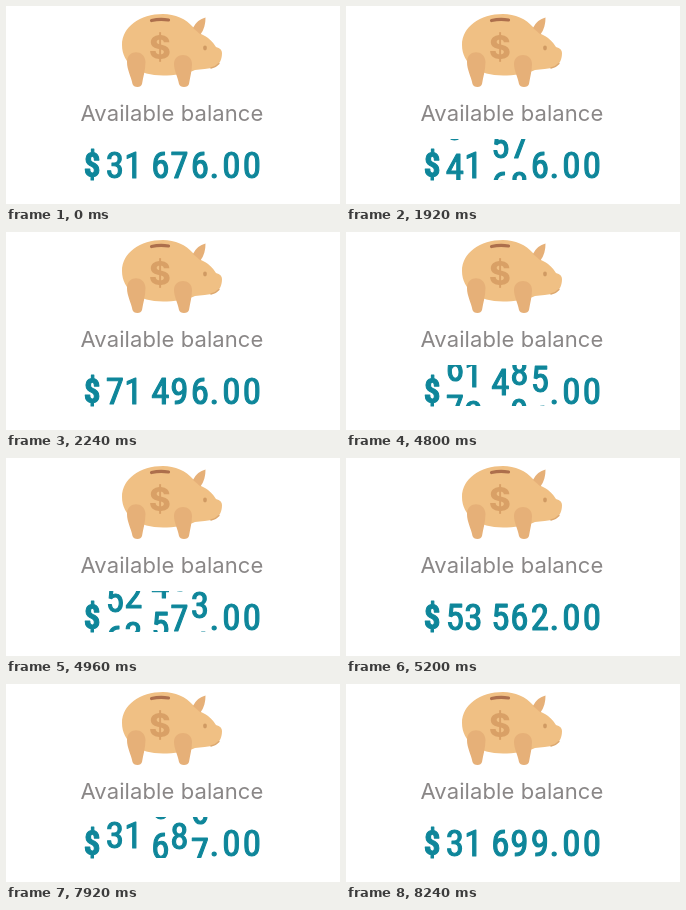
Animation, 334 px wide and 198 px high, one loop 9.04 s. Source, as an HTML page:

```html
<!DOCTYPE html>
<html lang="en">
<head>
<meta charset="utf-8">
<title>Available balance</title>
<style>
  html, body { margin: 0; width: 100%; height: 100%; overflow: hidden; background: #fff; }
  svg { display: block; width: 334px; height: 198px; }
  text { text-anchor: middle; }
  .coin { font: 800 33px Inter, "Open Sans", sans-serif; fill: #d9a066; }
  .label { font: 400 22px Inter, "Open Sans", sans-serif; letter-spacing: .1px; fill: #8a8787; }
  .amount {
    font: 400 37px "Roboto Condensed", Roboto, "Liberation Sans", sans-serif;
    font-stretch: 75%;
    fill: #0e869a; stroke: #0e869a; stroke-width: 1.1; stroke-linejoin: round;
  }
  .amount .sign { font-size: 33px; font-weight: 600; }
</style>
</head>
<body>
<svg viewBox="0 0 334 198">
  <defs>
    <clipPath id="window"><rect x="98" y="133" width="108" height="41"/></clipPath>
  </defs>

  <g id="pig">
    <path fill="#f0c084" d="M116 39C116 21 134 8 157 8C169 8 180 13 187 21L195 28
      C202 31 207 36 210 41C214 42 216 44 216 47C216 53 214 58 209 61
      C202 63 195 63 189 64C180 68 168 69.500 157 69.500C133 69.500 116 58 116 39Z"/>
    <path d="M205 62Q210 61 213 57.500" fill="none" stroke="#dca870" stroke-width="1.300" stroke-linecap="round"/>
    <g fill="#e6b078">
      <path d="M187 22C190 16 194 13 199.500 11.500C199.500 18 198 24 194.500 28.500Z"/>
      <path d="M121 56C121 43 139 43 139.500 56C139.500 64 137 71 136 78Q135 81 131.500 81Q127.500 81 126.500 78C125 70 121 64 121 56Z"/>
      <path d="M168 58C168 46 186 46 186 58C186 65 184 71 183 78Q182 81 178 81Q174 81 173 78C172 71 168 65 168 58Z"/>
    </g>
    <path d="M145.500 14.500Q154 12.500 162.500 14" fill="none" stroke="#ad6f4c" stroke-width="3.200" stroke-linecap="round"/>
    <ellipse cx="199" cy="42" rx="1.900" ry="2.400" fill="#d09a63"/>
    <text class="coin" x="154" y="53">$</text>
  </g>

  <text class="label" x="166" y="115">Available balance</text>

  <g class="amount">
    <text class="sign" x="86" y="170">$</text>
    <g id="reels" clip-path="url(#window)"></g>
    <text x="208.500" y="172">.</text>
    <text x="225.500" y="172">0</text>
    <text x="246" y="172">0</text>
  </g>
</svg>

<script>
  const LOOP = 9040, TICK = 80, PITCH = 40, BASE = 172;
  const columns = [109, 127.5, 154.5, 173.5, 194];
  const first = [3, 1, 6, 7, 6];

  // Each roll: start time, target digits, duration per column.
  const rolls = [
    { at: 1870, to: [7, 1, 4, 9, 6], ms: [331, 311, 311, 311, 311] },
    { at: 4750, to: [5, 3, 5, 6, 2], ms: [371, 371, 354, 446, 446] },
    { at: 7630, to: [3, 1, 6, 9, 9], ms: [411, 411, 390, 559, 602] }
  ];

  const svgNode = (name, parent) =>
    parent.appendChild(document.createElementNS("http://www.w3.org/2000/svg", name));

  const reels = columns.map(x => {
    const reel = svgNode("g", document.getElementById("reels"));
    return Array.from({ length: 10 }, (_, digit) => {
      const text = svgNode("text", reel);
      text.setAttribute("x", x);
      text.textContent = digit;
      return text;
    });
  });

  const easeOut = p => Math.sin(Math.min(1, Math.max(0, p)) * Math.PI / 2);

  function position(column, time) {
    let value = first[column];
    for (const { at, to, ms } of rolls) {
      value += (to[column] - value) * easeOut((time - at) / ms[column]);
    }
    return value;
  }

  function draw(time) {
    reels.forEach((digits, column) => {
      const value = position(column, time);
      digits.forEach((text, digit) => {
        const offset = (digit - value) * PITCH;
        text.setAttribute("y", BASE + offset);
        text.setAttribute("visibility", Math.abs(offset) < PITCH ? "visible" : "hidden");
      });
    });
  }

  const start = performance.now();
  function frame() {
    const time = (performance.now() - start) % LOOP;
    draw(Math.floor(time / TICK) * TICK);
    requestAnimationFrame(frame);
  }
  frame();
</script>
</body>
</html>
```
